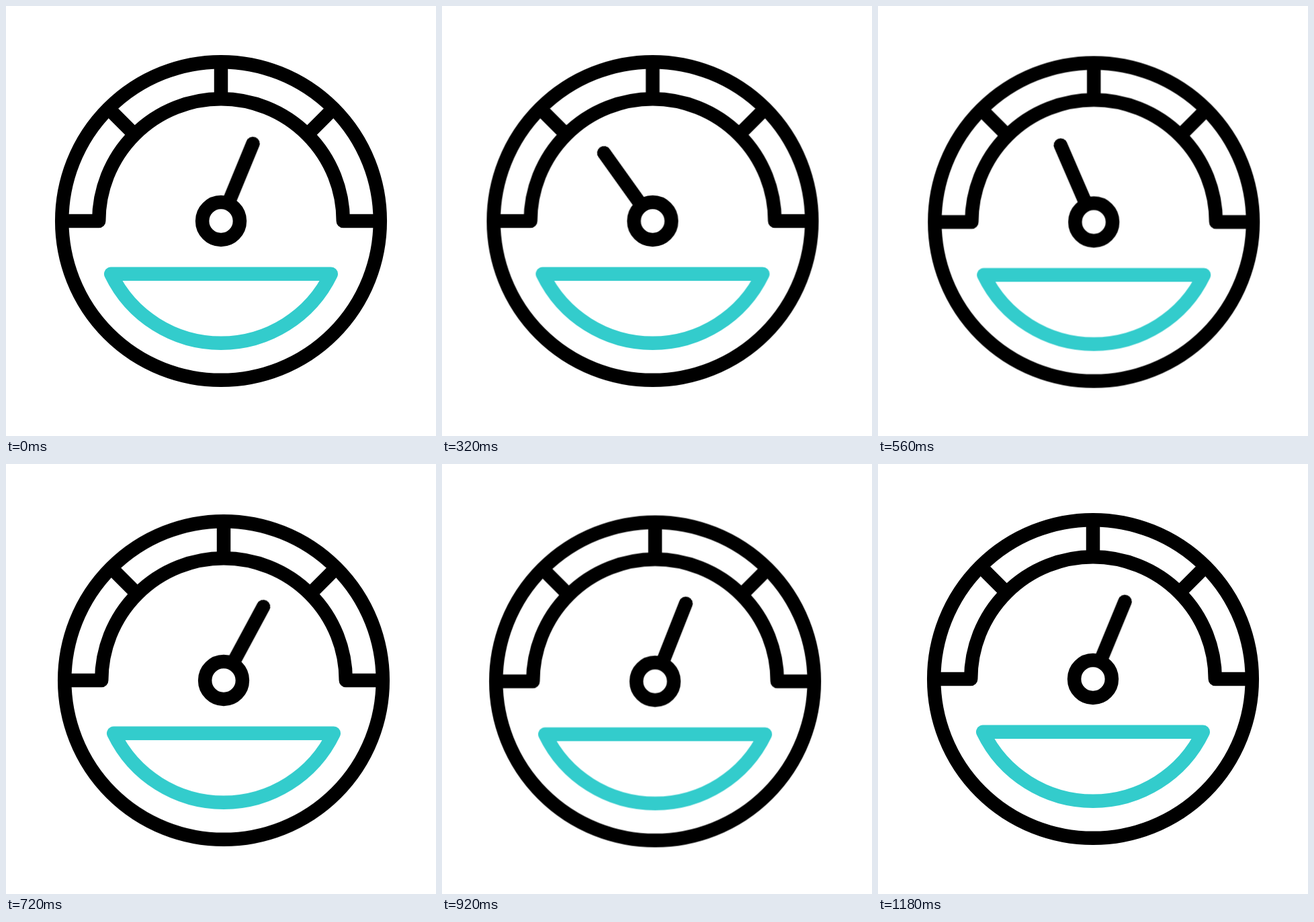
These frames come from a looping animation (640 px wide and 640 px high, 1.2 s). An HTML page:

```html
<!DOCTYPE html>
<html lang="en">
<head>
<meta charset="utf-8">
<title>Gauge</title>
<style>
  html, body {
    margin: 0;
    width: 100%;
    height: 100%;
    overflow: hidden;
    background: #fff;
  }
  svg {
    display: block;
    width: 100%;
    height: 100%;
    fill: none;
    stroke: #000;
    stroke-width: 20.5;
    stroke-linejoin: round;
  }
  .sway, .bob, .needle {
    animation: sway 1200ms linear infinite;
  }
  .bob { animation-name: bob; }
  .needle {
    animation-name: swing;
    animation-timing-function: ease-in-out;
    transform-origin: 0 0;
    stroke-linecap: round;
  }
  .bowl { stroke: #3cc; }

  /* the whole gauge trembles, the two axes run separately */
  @keyframes sway {
    0% { transform: translateX(0); }
    10% { transform: translateX(-2px); }
    27.5% { transform: translateX(-6.7px); }
    46.67% { transform: translateX(1.2px); }
    57.08% { transform: translateX(5.2px); }
    76.67% { transform: translateX(-2.8px); }
    87.5% { transform: translateX(-6.5px); }
    98.33%, 100% { transform: translateX(0); }
  }
  @keyframes bob {
    0% { transform: translateY(0); }
    10% { transform: translateY(-2px); }
    13.33% { transform: translateY(-2.5px); }
    26.67% { transform: translateY(0); }
    38.33% { transform: translateY(2.1px); }
    46.67% { transform: translateY(1.5px); }
    53.33% { transform: translateY(1.5px); }
    60% { transform: translateY(2px); }
    75% { transform: translateY(3.6px); }
    76.67% { transform: translateY(3.5px); }
    87.5% { transform: translateY(.1px); }
    98.33%, 100% { transform: translateY(0); }
  }
  @keyframes swing {
    0% { transform: rotate(22.4deg); }
    20% { transform: rotate(-40deg); }
    30% { transform: rotate(-34.3deg); }
    40% { transform: rotate(-39.5deg); }
    60% { transform: rotate(28.3deg); }
    70% { transform: rotate(18.5deg); }
    80%, 100% { transform: rotate(22.4deg); }
  }
</style>
</head>
<body>
<svg viewBox="-320 -320 640 640">
  <g class="sway">
    <g class="bob">
      <circle r="236.8"/>
      <path d="M-236.8 0H-181.8A181.8 181.8 0 0 1 181.8 0H236.8"/>
      <path id="tick" d="M0-236.8V-181.8"/>
      <use href="#tick" transform="rotate(-45)"/>
      <use href="#tick" transform="rotate(45)"/>
      <path class="needle" d="M0-30V-124.4"/>
      <circle r="27.9"/>
      <path class="bowl" d="M-163.8 78.8H163.8A181.8 181.8 0 0 1-163.8 78.8Z"/>
    </g>
  </g>
</svg>
</body>
</html>
```
